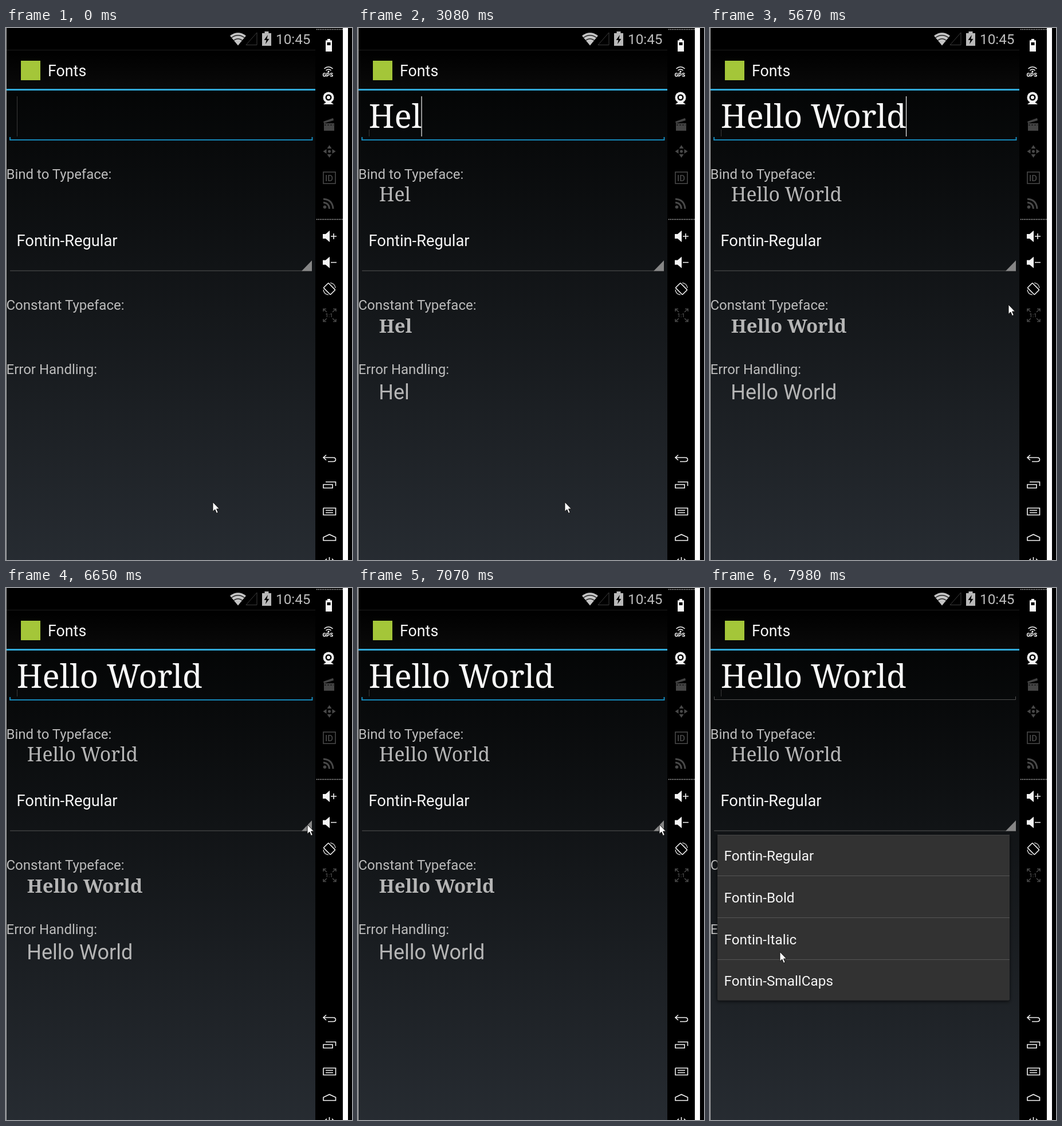
Write an HTML page that moves like this. It is 604 by 927 pixels and loops after 8 s.

```html
<!DOCTYPE html>
<html lang="en">
<head>
<meta charset="utf-8">
<title>Fonts</title>
<style>
  html, body { margin: 0; width: 100%; height: 100%; overflow: hidden; background: #000; }
  svg { display: block; width: 604px; height: 927px; }
  text { font-family: Roboto, sans-serif; white-space: pre; }
  .serif { font-family: "Noto Serif", serif; }
  .label { font-size: 24px; fill: #bcbcbc; }
  .echo { fill: #b6b6b6; }
  .item { font-size: 24.3px; fill: #f5f5f5; }
  .line { fill: none; stroke: #f2f2f2; stroke-width: 1.6; }
  .dim { fill: none; stroke: #484848; stroke-width: 1.6; }
</style>
</head>
<body>
<svg viewBox="0 0 604 927" xmlns="http://www.w3.org/2000/svg">
  <defs>
    <linearGradient id="sky" gradientUnits="userSpaceOnUse" x1="0" y1="60" x2="0" y2="940">
      <stop offset="0" stop-color="#020303"/>
      <stop offset="1" stop-color="#272c32"/>
    </linearGradient>
    <linearGradient id="bar" x2="0" y2="1">
      <stop offset="0" stop-color="#000"/>
      <stop offset="1" stop-color="#0a0a0a"/>
    </linearGradient>
    <filter id="shadow" x="-5%" y="-5%" width="110%" height="112%">
      <feDropShadow dx="0" dy="2" stdDeviation="3" flood-color="#000" flood-opacity=".7"/>
    </filter>
  </defs>

  <rect width="604" height="927"/>
  <rect width="1" height="927" fill="#a8a8a8"/>
  <rect x="1" y="108" width="539" height="819" fill="url(#sky)"/>

  <!-- Status bar -->
  <path d="M391 13.5Q405 3 419 13.5L405 30.5Z" fill="#c4c4c4"/>
  <path d="M393.5 17Q405 8.5 416.5 17M397.5 21.5Q405 16 412.5 21.5" fill="none" stroke="#222" stroke-width="1.5"/>
  <path d="M419 29.5H438V8Z" fill="none" stroke="#3c3c3c"/>
  <path d="M447 9h4.500v-3h7v3h4.500v22h-16z" fill="#b9b9b9"/>
  <path d="M457 12l-6.500 9h4l-1.500 7 6.500-9h-4z" fill="#050505"/>
  <text x="471" y="28" font-size="24.300" fill="#bdbdbd">10:45</text>

  <!-- Action bar -->
  <rect x="1" y="39" width="539" height="67" fill="url(#bar)"/>
  <path d="M1 38.500H540" stroke="#1d1d1d"/>
  <rect x="26" y="57" width="34" height="34" fill="#a4c639"/>
  <text x="73" y="84" font-size="26.800" fill="#f5f5f5">Fonts</text>
  <rect x="1" y="106" width="539" height="3" fill="#31a9d8"/>

  <!-- Form -->
  <path id="field" fill="none"/>
  <g fill="#3a3a3a">
    <rect id="caretTop" x="19" y="119" width="1" height="36"/>
    <rect id="caretMiddle" x="19" y="155" width="1" height="22"/>
    <rect x="19" y="177" width="1" height="12"/>
  </g>
  <text id="entry" class="serif typed" x="18.800" y="173.500" font-size="56.400" fill="#f8f8f8"></text>
  <rect id="caret" y="119" width="1.300" height="70" fill="#e4e4e4"/>

  <text class="label" x="0.500" y="263">Bind to Typeface:</text>
  <text class="serif typed echo" x="36.800" y="301.500" font-size="33.700"></text>

  <g id="pressed">
    <rect x="1" y="311" width="539" height="119" rx="4" fill="#33b5e5" opacity=".14"/>
    <rect x="7" y="317" width="527" height="106" fill="#33b5e5" opacity=".3"/>
  </g>
  <text x="18.500" y="380" font-size="27.300" fill="#f5f5f5">Fontin-Regular</text>
  <path d="M7 423H534" stroke="#555"/>
  <path d="M534 405V423.500H516Z" fill="#868686"/>

  <text class="label" x="0.500" y="491">Constant Typeface:</text>
  <text class="serif typed echo" x="36.800" y="530.500" font-size="33" font-weight="700"></text>
  <text class="label" x="0.500" y="603">Error Handling:</text>
  <text class="typed echo" x="36.300" y="647" font-size="36"></text>

  <g id="menu">
    <rect x="13" y="430" width="510" height="288.500" rx="2" fill="#303030" filter="url(#shadow)"/>
    <path d="M13 430.500H523" stroke="#454545"/>
    <path d="M13 501.500H523M13 574.500H523M13 647.500H523" stroke="#565656"/>
    <text class="item" x="24.500" y="475">Fontin-Regular</text>
    <text class="item" x="24.500" y="547.500">Fontin-Bold</text>
    <text class="item" x="24.500" y="620.500">Fontin-Italic</text>
    <text class="item" x="24.500" y="693">Fontin-SmallCaps</text>
  </g>

  <!-- Emulator toolbar -->
  <rect x="540" width="49" height="927"/>
  <rect x="588" width="9" height="927" fill="#fff"/>
  <path d="M542 2.500H588M542 333.500H588" stroke="#ccc" stroke-width="1.500" stroke-dasharray="1.500 1.500"/>
  <g fill="#f5f5f5">
    <path d="M558 21.500h3v-2.500h5v2.500h3v19.500h-11z"/>
    <path d="M560.500 25h6v5h-6z" fill="#000"/>
    <circle cx="563" cy="76" r="1.600"/>
    <text x="552.500" y="85" font-size="9.500" font-weight="900">GPS</text>
    <circle cx="563" cy="121" r="9.500"/>
    <path d="M554 133l5-4h8l5 4z"/>
    <circle cx="563" cy="121" r="5.500" fill="#000"/>
    <circle cx="563" cy="121" r="3"/>
    <path id="speaker" d="M553 359h5l7-6v20l-7-6h-5z"/>
    <use href="#speaker" y="45.500"/>
  </g>
  <path class="line" d="M555.500 71Q563 64.500 570.500 71M558.500 74Q563 70 567.500 74"/>
  <path class="line" d="M567 363H577M572 358V368M567 408.500H577"/>

  <path d="M555 166h18v13h-18zM554 163l17-6 1 4-17 5z" fill="#444"/>
  <path d="M556 169h16" stroke="#000" stroke-dasharray="3 2"/>
  <g fill="#484848">
    <path id="arrow" d="M564.500 204l4 6h-8z"/>
    <use href="#arrow" transform="rotate(90 564.500 215)"/>
    <use href="#arrow" transform="rotate(180 564.500 215)"/>
    <use href="#arrow" transform="rotate(270 564.500 215)"/>
    <circle cx="564.500" cy="215" r="2.500"/>
    <text x="557" y="266.500" font-size="15" font-weight="500">ID</text>
    <circle cx="556.500" cy="312" r="2.800"/>
    <text x="557.500" y="503.500" font-size="9" font-weight="700">1:1</text>
  </g>
  <rect class="dim" x="554" y="251" width="21" height="20"/>
  <path class="dim" style="stroke-width:3" d="M554 304Q564 305 564.500 315M554 298Q570 299 571 315"/>
  <path class="dim" d="M554 494V489.500H559M554 489.500L560 495M571 489.500H576V494M576 489.500L570 495M554 507V511.500H559M554 511.500L560 506M571 511.500H576V507M576 511.500L570 506"/>

  <rect class="line" x="558.500" y="446" width="12" height="17" rx="1" transform="rotate(-45 564.500 454.500)"/>
  <path class="line" style="stroke-width:1.200" d="M566 444Q574 445 575 453M554 456Q555 464 563 465"/>
  <path class="line" d="M559 744L554 748.500L559 753M554 748.500H571Q575.500 748.500 575.500 752T571 755.500H562"/>
  <path class="line" d="M554 795.500H570V801.500H554ZM558 791H575.500V798"/>
  <path class="line" d="M554 836.500H575.500V848.500H571M554 836.500V848.500H571M558 840.500H571M558 844.500H571"/>
  <path class="line" d="M554 893V887.500L564.500 882.500L575.500 887.500V893Z"/>
  <path class="line" d="M564.500 922V927M560 925Q557 927 557 930M569 925Q572 927 572 930"/>

  <path id="pointer" d="M0 0V16.500L3.800 13L6.500 19.500L9.300 18.300L6.600 12H11.500Z" fill="#fff" stroke="#111"/>
</svg>

<script>
const LOOP = 8000, TICK = 70;
const PHRASE = "Hello World";
const $ = id => document.getElementById(id);
const typedTexts = document.querySelectorAll(".typed");

// Moments at which the phrase gains letters: [time, length]
const keystrokes = [
  [3080, 3], [3150, 4], [3360, 5], [3430, 6], [3500, 7],
  [3640, 8], [3710, 9], [3850, 10], [3920, 11]
];
const emptyCaretOn = [[0, 350], [770, 1260], [1610, 2030], [2450, 2940]];
const caretOn = [[3080, 4340], [4620, 5040], [5530, 5950], [6160, 6650]];

// Pointer strokes: quadratic curves from one rest point to the next
const moves = [
  { start: 5110, end: 5670, from: [361, 826], via: [440, 640], to: [521, 482] },
  { start: 5740, end: 5950, from: [521, 482], via: [532, 478], to: [538, 466] },
  { start: 6020, end: 6650, from: [538, 466], via: [536, 430], to: [526, 412] },
  { start: 7490, end: 7980, from: [526, 412], via: [210, 780], to: [122, 634] }
];

const within = (spans, t) => spans.some(([a, b]) => t >= a && t < b);
const show = (id, on) => $(id).setAttribute("visibility", on ? "visible" : "hidden");
const ease = p => p * p * (3 - 2 * p);

function pointerAt(t) {
  const move = moves.filter(m => t >= m.start).pop();
  if (!move) return moves[0].from;
  const p = ease(Math.min(1, (t - move.start) / (move.end - move.start)));
  const q = 1 - p;
  return [0, 1].map(i => q * q * move.from[i] + 2 * p * q * move.via[i] + p * p * move.to[i]);
}

function render(time) {
  const t = Math.floor(time / TICK) * TICK;
  const length = keystrokes.reduce((n, [at, count]) => t >= at ? count : n, 0);
  const typed = PHRASE.slice(0, length);
  typedTexts.forEach(el => { if (el.textContent !== typed) el.textContent = typed; });

  show("caretTop", within(emptyCaretOn, t));
  show("caretMiddle", t < 350);
  show("caret", within(caretOn, t));
  if (length) $("caret").setAttribute("x", 18 + $("entry").getComputedTextLength());

  const focused = t < 7560;
  $("field").setAttribute("d", focused ? "M7 190V195H534.5V190" : "M7.5 189V194.5H533.5V189");
  $("field").setAttribute("stroke", focused ? "#1688b8" : "#505050");
  $("field").setAttribute("stroke-width", focused ? 2 : 1);

  show("pressed", within([[6790, 7070]], t));
  show("menu", t >= 7210);
  $("menu").setAttribute("opacity", t < 7280 ? 0.6 : 1);
  $("pointer").setAttribute("transform", `translate(${pointerAt(t)})`);
}

const began = performance.now();
function frame() {
  render((performance.now() - began) % LOOP);
  requestAnimationFrame(frame);
}
render(0);
requestAnimationFrame(frame);
</script>
</body>
</html>
```
